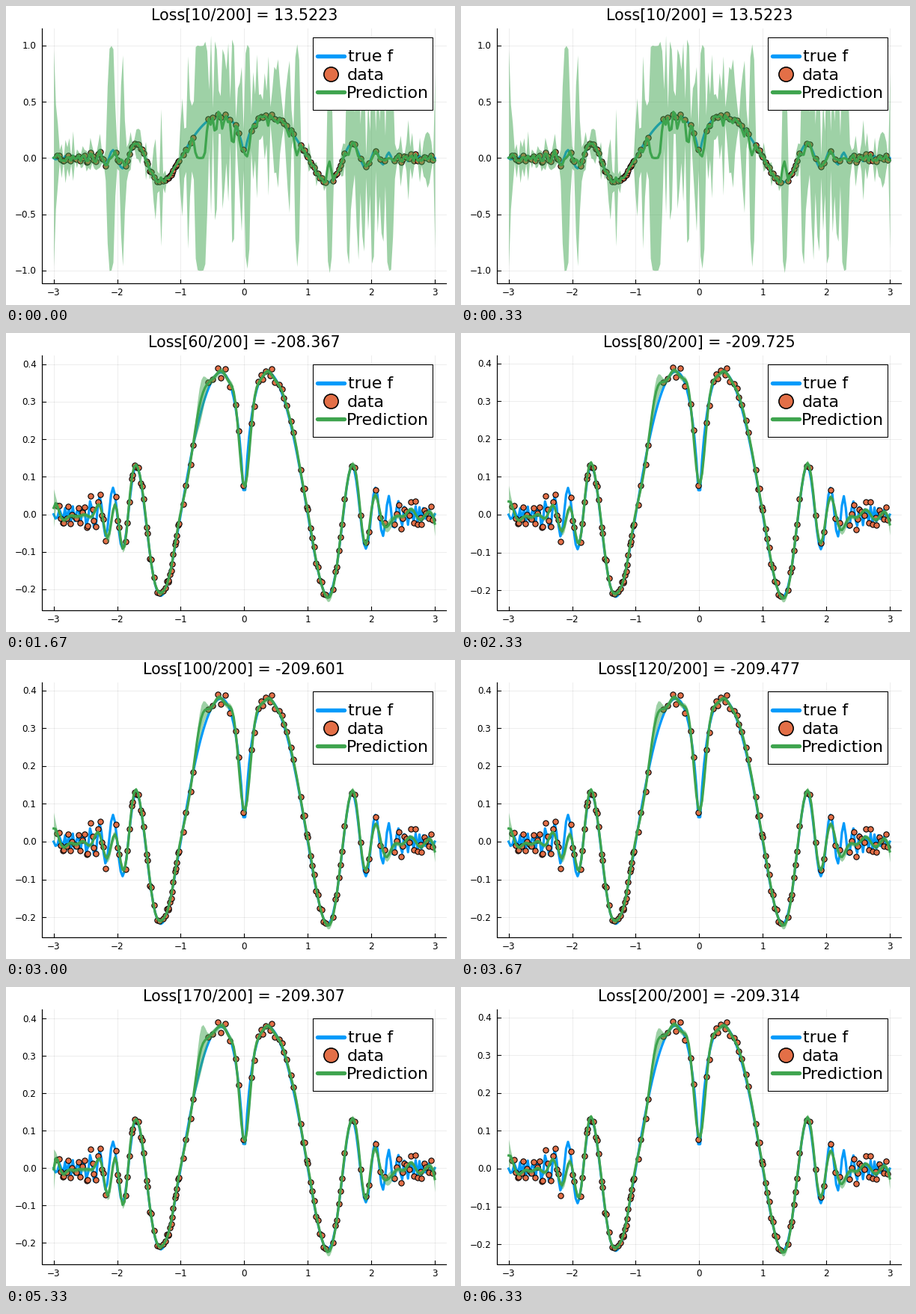
A matplotlib script for the animation above (6660 ms loop, 600x400 px).

```python
import numpy as np
import matplotlib.pyplot as plt
from matplotlib.animation import FuncAnimation
from matplotlib.patches import Rectangle

W, H, DPI = 600, 400, 100
PX = 72 / DPI  # points per pixel
BLUE, ORANGE, GREEN = "#009afa", "#e36f47", "#3ea44e"
TOP, BOTTOM, RIGHT = 30.2, 371.2, 588.3
NOISE = 0.01
GAP_X = -0.69  # middle of the widest hole in the samples

# Training course: deviation left inside the hole, and the loss.
KEY_STEPS = [10, 20, 30, 40, 80, 120, 150, 170, 200]
KEY_GAPS = [1, 0.4, 0.14, 0.068, 0.036, 0.036, 0.06, 0.06, 0.036]
KEY_LOSS = [13.5223, -142.871, -192.645, -207.008, -209.725,
            -209.477, -209.476, -209.307, -209.314]

# Stretches of samples between the holes: start, stop, count.
RUNS = [(-2.955, -2.18, 26), (-2.02, -1.97, 3), (-1.87, -1.46, 15),
        (-1.42, -1.24, 5), (-1.22, -1.03, 12), (-0.96, -0.81, 4),
        (-0.565, -0.02, 9), (0.11, 0.77, 15), (0.89, 1.28, 14),
        (1.40, 1.58, 7), (1.69, 2.21, 8), (2.36, 2.97, 19)]

plt.rcParams["font.family"] = "DejaVu Sans"


def target(x):
    return np.sinc(np.abs(x) ** np.abs(x))


def sample_run(start, stop, count):
    xs = np.linspace(start, stop, count)
    step = xs[1] - xs[0]
    xs[1:-1] += rng.uniform(-0.35, 0.35, count - 2) * step
    return xs


rng = np.random.default_rng(4)
x_data = np.concatenate([sample_run(*run) for run in RUNS])
y_data = target(x_data) + NOISE * rng.uniform(-1.6, 1.6, len(x_data))
x_test = np.linspace(-3, 3, 200)
y_true = target(x_test)


def kernel(a, b, scale):
    return np.exp(-0.5 * ((a[:, None] - b[None, :]) / scale) ** 2)


def predict(x, scale):
    """Gaussian process mean and deviation at x."""
    gram = kernel(x_data, x_data, scale) + NOISE**2 * np.eye(len(x_data))
    cross = kernel(x, x_data, scale)
    weights = np.linalg.solve(gram, cross.T)
    var = 1 - np.sum(cross * weights.T, axis=1)
    return weights.T @ y_data, np.sqrt(np.maximum(var, 0))


def scale_for(gap):
    """Length scale that leaves the given deviation inside the hole."""
    low, high = 0.027, 0.5
    for _ in range(20):
        mid = (low + high) / 2
        if predict(np.array([GAP_X]), mid)[1][0] > gap:
            low = mid
        else:
            high = mid
    return mid


def fit(step):
    """Mean, deviation and value range at a training step."""
    gap = np.interp(step, KEY_STEPS, KEY_GAPS)
    mean, dev = predict(x_test, scale_for(gap))
    widths = [0.036, 0.068, 0.14, 1]
    low = np.interp(gap, widths, [-0.2342, -0.2397, -0.245, -1.052])
    high = np.interp(gap, widths, [0.4016, 0.406, 0.41, 1.088])
    return mean, dev, low, high


def tick_layout(span):
    if span > 1.3:
        return 0.5, 1
    return (0.25, 2) if span > 0.85 else (0.1, 1)


fits = [fit(10 * (i + 1)) for i in range(20)]

fig = plt.figure(figsize=(W / DPI, H / DPI), dpi=DPI, facecolor="white")
ax = fig.add_axes([0, 0, 1, 1])


def line(xs, ys, color, width, z, **kw):
    ax.plot(xs, ys, color=color, lw=width * PX, zorder=z, **kw)


def text(x, y, label, size, **kw):
    ax.text(x, y, label, fontsize=size * PX, va="baseline", zorder=12, **kw)


def dots(xs, ys, size, edge, z):
    ax.plot(xs, ys, "o", ms=size * PX, mfc=ORANGE, mec="black",
            mew=edge * PX, zorder=z)


def draw_axes(left, to_x, to_y, low, high, spacing, digits):
    for v in range(-3, 4):
        x = to_x(v)
        line([x, x], [TOP, BOTTOM], "black", 0.7, 1, alpha=0.1)
        line([x, x], [BOTTOM, BOTTOM - 5], "black", 1.1, 7)
        text(x, 387.3, str(v).replace("-", "\u2212"), 12, ha="center")
    for k in range(int(np.ceil(low / spacing)), int(high / spacing) + 1):
        y = to_y(k * spacing)
        line([left, RIGHT], [y, y], "black", 0.7, 1, alpha=0.1)
        line([left, left + 5], [y, y], "black", 1.1, 7)
        label = f"{k * spacing:.{digits}f}".replace("-", "\u2212")
        text(left - 7.8, y + 4.4, label, 12, ha="right")
    line([left, left, RIGHT], [TOP, BOTTOM, BOTTOM], "black", 1.2, 7)


def draw_legend():
    ax.add_patch(Rectangle((410, 42), 160, 97.3, fc="white", ec="black",
                           lw=1.1 * PX, zorder=10))
    for y, color in ((66.7, BLUE), (115, GREEN)):
        line([415.5, 452], [y, y], color, 5.4, 11, solid_capstyle="round")
    dots([433.5], [90.8], 19.3, 1.6, 11)
    text(457.2, 74.5, "true f", 22.2)
    text(456, 98.7, "data", 22.2)
    text(454.5, 122.9, "Prediction", 22.2)


def draw(i):
    step = 10 * (i + 1)
    mean, dev, low, high = fits[i]
    pad = 0.03 * (high - low)
    low, high = low - pad, high + pad
    spacing, digits = tick_layout(high - low)
    left = 48.4 + 7.6 * (digits - 1)

    def to_x(v):
        return left + (v + 3.18) / 6.36 * (RIGHT - left)

    def to_y(v):
        return BOTTOM - (v - low) / (high - low) * (BOTTOM - TOP)

    ax.clear()
    ax.set_xlim(0, W)
    ax.set_ylim(H, 0)
    ax.axis("off")
    draw_axes(left, to_x, to_y, low, high, spacing, digits)

    xs = to_x(x_test)
    line(xs, to_y(y_true), BLUE, 3.2, 3)
    dots(to_x(x_data), to_y(y_data), 7.3, 1.1, 4)
    ax.fill_between(xs, to_y(mean - dev), to_y(mean + dev), color=GREEN,
                    alpha=0.5, lw=0, zorder=5)
    line(xs, to_y(mean), GREEN, 3.2, 6)

    draw_legend()
    loss = np.interp(step, KEY_STEPS, KEY_LOSS)
    text((left + RIGHT) / 2, 18.8, f"Loss[{step}/200] = {loss:.6g}",
         20.7, ha="center")
    return []


anim = FuncAnimation(fig, draw, frames=20, interval=333, init_func=lambda: [],
                     repeat=True, repeat_delay=0, blit=False)
plt.show()
```
